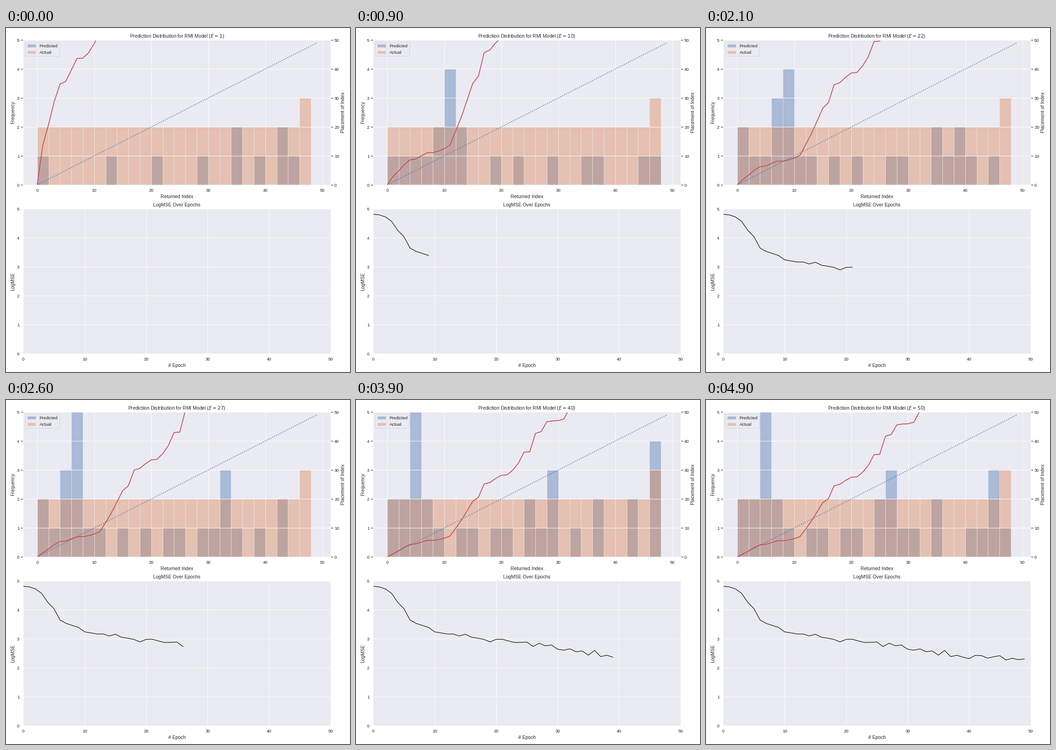
Recreate the animation shown at these times as a matplotlib script. Size 748 by 748 pixels, loop 5 s.

```python
import matplotlib.pyplot as plt
import numpy as np
from matplotlib.animation import FuncAnimation

SIZE = 748
EPOCHS = 50
BLUE, ORANGE, RED, BLACK = "#4C72B0", "#DD8452", "#C44E52", "#1A1A1A"
INK = "0.15"

plt.rcParams.update({
    "font.family": "Liberation Sans", "font.size": 12,
    "axes.titlesize": 12, "axes.labelsize": 12,
    "xtick.labelsize": 11, "ytick.labelsize": 11, "legend.fontsize": 11,
    "text.color": INK, "axes.labelcolor": INK,
    "xtick.color": INK, "ytick.color": INK,
    "axes.facecolor": "#EAEAF2", "axes.edgecolor": "white",
    "axes.linewidth": 1.25, "axes.grid": True, "axes.axisbelow": True,
    "grid.color": "white", "grid.linewidth": 1,
    "xtick.major.size": 6, "ytick.major.size": 6,
    "xtick.major.width": 1.25, "ytick.major.width": 1.25,
    "xtick.bottom": False, "ytick.left": False,
    "lines.solid_capstyle": "round", "mathtext.fontset": "dejavusans",
})

LOG_MSE = np.array([
    4.813, 4.79, 4.72, 4.566, 4.257, 4.04, 3.646, 3.53, 3.46, 3.39,
    3.238, 3.203, 3.165, 3.165, 3.098, 3.157, 3.052, 3.02, 2.98, 2.892,
    2.98, 2.983, 2.924, 2.871, 2.877, 2.887, 2.733, 2.846, 2.759, 2.785,
    2.64, 2.607, 2.65, 2.555, 2.578, 2.434, 2.60, 2.384, 2.432, 2.364,
    2.315, 2.427, 2.42, 2.332, 2.38, 2.416, 2.268, 2.327, 2.28, 2.305])

# Sorted keys of the model; the tail always lies above the visible range.
KEYS = np.concatenate([[
    0, 2.312, 3.397, 4.609, 5.514, 5.661, 6.265, 6.879, 6.882, 7.165, 7.646,
    8.31, 10.95, 13.65, 16.81, 20.03, 21.41, 25.88, 26.39, 27.71, 28.8,
    28.93, 30.54, 32.87, 36.6, 36.73, 42.95, 43.55, 46.87, 47.15, 47.25,
    47.8, 51.55], np.linspace(53, 110, 17)])
BIAS = 1.35
INDEX = np.arange(50)
BINS = np.arange(0, 50, 2)


def predict(epoch):
    """Linear model whose weight follows the root of the error."""
    weight = 0.674 + 10 ** (LOG_MSE[epoch] / 2) / 43.4
    return np.maximum(weight * KEYS - BIAS, 0)


def add_panel(bottom):
    left, width, height = 37.4, 668.4, 315
    return fig.add_axes([left / SIZE, 1 - bottom / SIZE,
                         width / SIZE, height / SIZE])


def draw_hist(values, color, label):
    return dist.hist(values, bins=BINS, color=color, alpha=0.4, label=label,
                     edgecolor="white", linewidth=1)[2]


fig = plt.figure(figsize=(12, 12), dpi=SIZE / 12, facecolor="white")
dist = add_panel(341.2)
loss = add_panel(708.2)

predicted_bars = draw_hist(predict(0), BLUE, "Predicted")
draw_hist(INDEX, ORANGE, "Actual")
dist.set(xlim=(-2.45, 51.45), ylim=(0, 5), xticks=range(0, 51, 10),
         yticks=range(6), xlabel="Returned Index", ylabel="Frequency")
dist.legend(loc="upper left", facecolor="#EAEAF2", edgecolor="0.8")
dist.tick_params(axis="y", left=True)

place = dist.twinx()
place.plot(INDEX, INDEX, ":", color=BLUE, lw=2)
red_line, = place.plot([], [], color=RED, lw=2)
place.set(xlim=(-2.45, 51.45), ylim=(0, 50), yticks=range(0, 51, 10),
          ylabel="Placement of Index")
place.tick_params(axis="y", right=True)

loss_line, = loss.plot([], [], color=BLACK, lw=1.5)
loss.set(xlim=(0, 50), ylim=(0, 5), xticks=range(0, 51, 10), yticks=range(6),
         xlabel="# Epoch", ylabel="LogMSE", title="LogMSE Over Epochs")


def update(epoch):
    values = predict(epoch)
    for bar, count in zip(predicted_bars, np.histogram(values, BINS)[0]):
        bar.set_height(count)
    red_line.set_data(INDEX, values)
    loss_line.set_data(np.arange(epoch + 1), LOG_MSE[:epoch + 1])
    dist.set_title(f"Prediction Distribution for RMI Model ($E={epoch + 1}$)")
    return [*predicted_bars, red_line, loss_line]


anim = FuncAnimation(fig, update, frames=EPOCHS, interval=100,
                     init_func=lambda: update(0), repeat=True)
plt.show()
```
